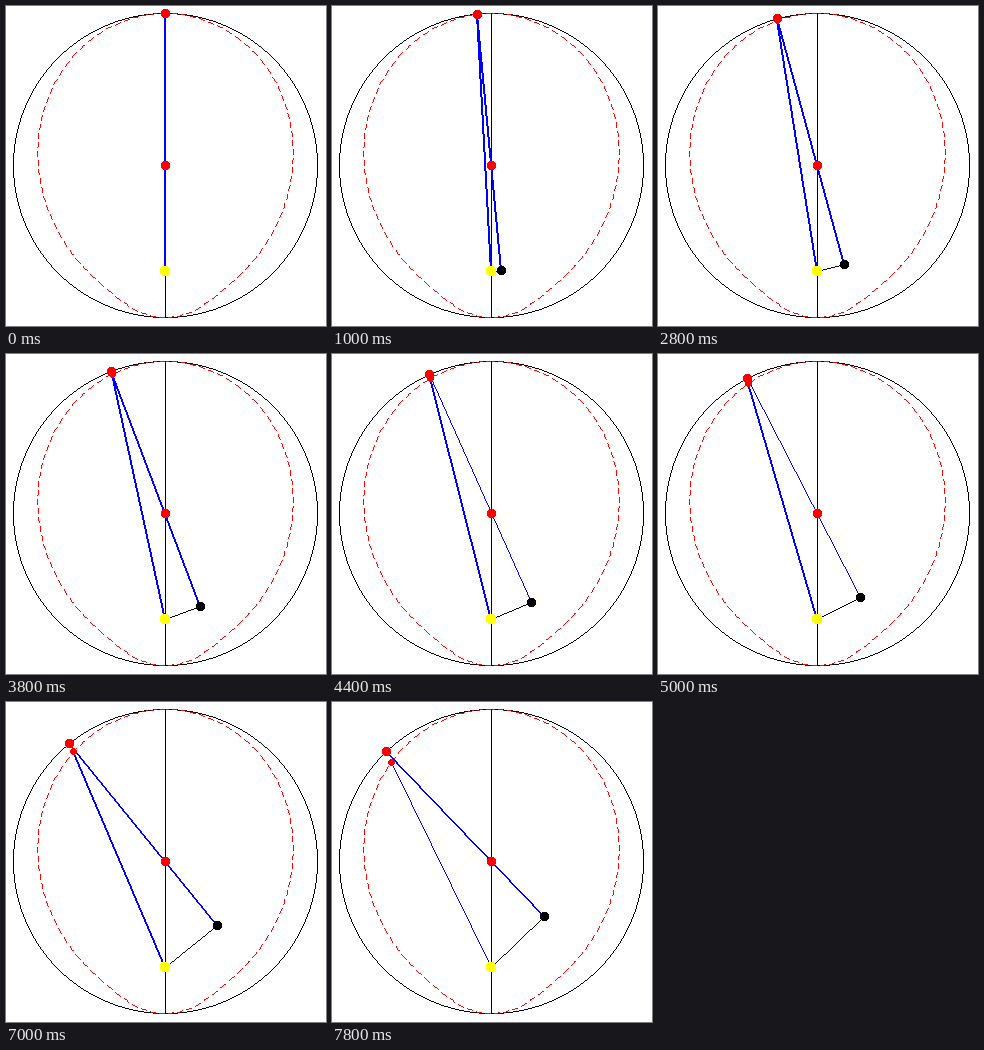
Animation, 320 px wide and 320 px high, one loop 8 s. Source, as a matplotlib script:

```python
import numpy as np
import matplotlib.pyplot as plt
from matplotlib.animation import FuncAnimation

SIZE, DPI = 320, 100
C, R, ECC = 159, 152, 0.7
SUN = np.array([C, C + ECC * R])
STEP = 0.032          # mean anomaly per frame, radians
FRAMES = 40

WHITE, BLACK = (255, 255, 255), (0, 0, 0)
RED, BLUE, YELLOW = (255, 0, 0), (0, 0, 255), (255, 255, 0)

ROWS, COLS = np.mgrid[:SIZE, :SIZE]


def on_circle(e):
    return np.array([C - R * np.sin(e), C - R * np.cos(e)])


def on_oval(e):
    """Diametral distance laid off from the sun towards the circle point."""
    d = on_circle(e) - SUN
    return SUN + d * R * (1 + ECC * np.cos(e)) / np.hypot(*d)


def anomaly(m):
    """Solve Kepler's equation, counted from aphelion, by Newton's method."""
    e = m / (1 + ECC)
    for _ in range(8):
        e -= (e + ECC * np.sin(e) - m) / (1 + ECC * np.cos(e))
    return e


def segment(a, b):
    """Pixels of a one-pixel line, one per step along the longer axis."""
    a, b = np.rint(a), np.rint(b)
    n = int(max(abs(b - a)))
    t = np.linspace(0, 1, n + 1)[:, None]
    return np.floor(a + (b - a) * t + 0.5).astype(int)


def curve(point, n=360):
    pts = [point(e) for e in np.linspace(0, 2 * np.pi, n + 1)]
    return np.concatenate([segment(a, b)[:-1] for a, b in zip(pts, pts[1:])])


def plot(img, pix, color):
    img[pix[:, 1], pix[:, 0]] = color


def stroke(img, a, b):
    """Blue rod, two pixels across; the pen thins out at middle slopes."""
    pix = segment(a, b)
    plot(img, pix, BLUE)
    dx, dy = np.abs(np.subtract(b, a))
    if not 23.5 < np.degrees(np.arctan2(dx, dy)) < 38:
        plot(img, pix - [1, 0], BLUE)


def dot(img, pos, radius, color):
    img[np.hypot(COLS - pos[0], ROWS - pos[1]) <= radius] = color


def backdrop():
    img = np.full((SIZE, SIZE, 3), WHITE, dtype=np.uint8)
    x = np.arange(-108, 109)
    y = np.rint(np.sqrt(R * R - x * x)).astype(int)
    for u, v in ((x, y), (x, -y), (y, x), (-y, x)):
        plot(img, np.column_stack([C + u, C + v]), BLACK)
    oval = curve(on_oval)
    plot(img, oval[np.arange(len(oval)) % 9 < 6], RED)
    plot(img, segment((C, C - R), (C, C + R)), BLACK)
    return img


BASE = backdrop()


def scene(i):
    e = anomaly(i * STEP)
    rim, oval = on_circle(e), on_oval(e)
    reach = ECC * R * np.cos(e)
    foot = np.array([C + reach * np.sin(e), C + reach * np.cos(e)])

    img = BASE.copy()
    plot(img, segment(SUN, foot), BLACK)
    stroke(img, rim, foot)
    stroke(img, oval, SUN)
    dot(img, np.rint(foot), 4.5, BLACK)
    dot(img, (C, C), 4.5, RED)
    dot(img, np.rint(SUN) - 0.5, 5.2, YELLOW)
    dot(img, np.rint(oval), 3.6, RED)
    dot(img, np.rint(rim), 4.5, RED)
    return img


fig = plt.figure(figsize=(SIZE / DPI, SIZE / DPI), dpi=DPI, facecolor="white")
ax = fig.add_axes([0, 0, 1, 1])
ax.axis("off")
view = ax.imshow(scene(0), interpolation="nearest", aspect="auto")


def update(i):
    view.set_data(scene(i))
    return (view,)


anim = FuncAnimation(fig, update, frames=FRAMES, interval=200,
                     repeat=True, repeat_delay=0)
plt.show()
```
